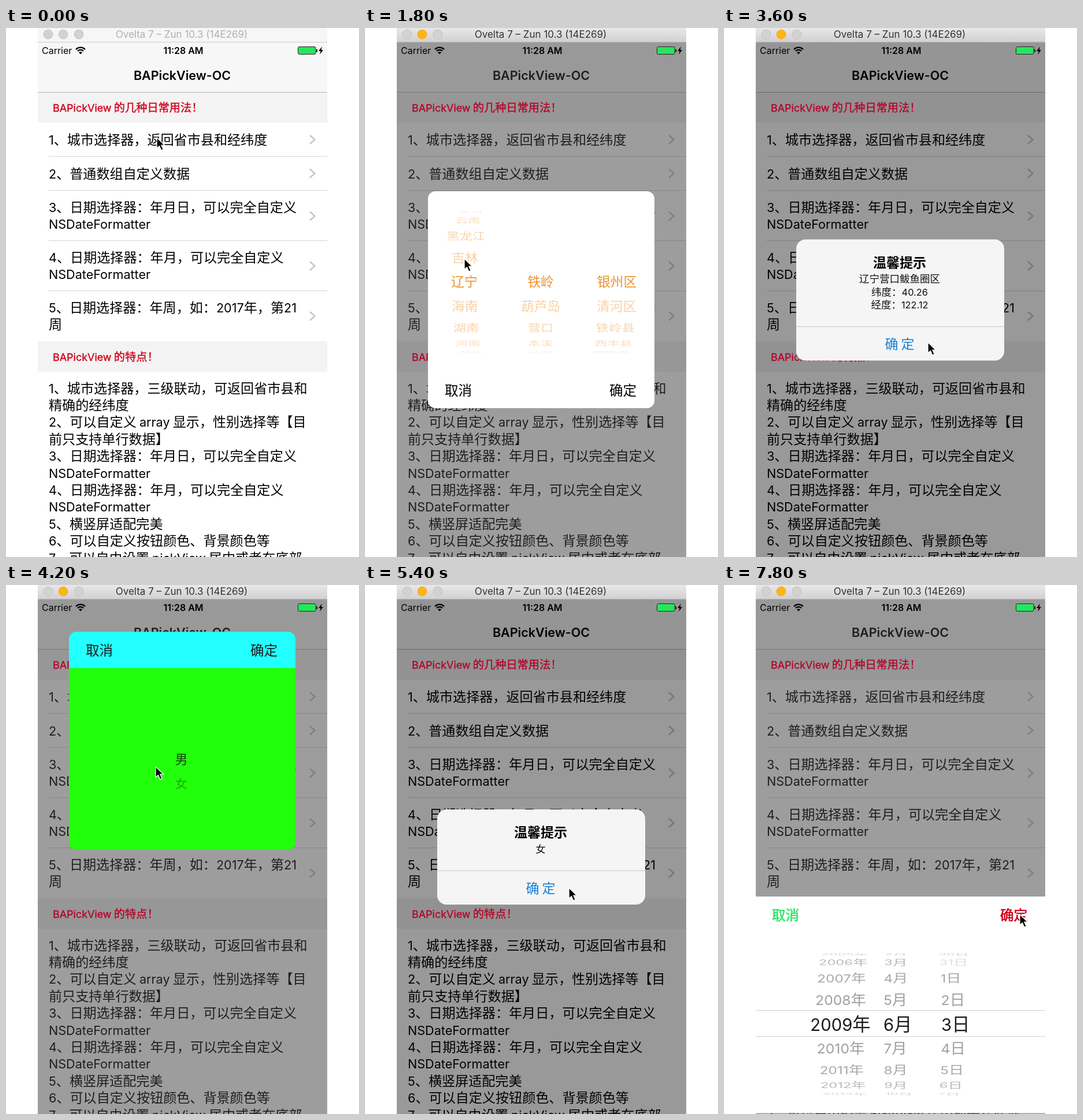
Write an HTML page that moves like this. It is 611 by 917 pixels and loops after 8 s.

```html
<!DOCTYPE html>
<html lang="zh-CN">
<head>
<meta charset="utf-8">
<title>BAPickView-OC</title>
<style>
  html, body { margin: 0; width: 100%; height: 100%; overflow: hidden; background: #fff; }
  #stage { display: block; width: 611px; height: 917px; font-family: "Noto Sans CJK SC", "Noto Sans CJK", sans-serif; }
  tspan { font-family: Inter, sans-serif; font-size: .935em; }
</style>
</head>
<body>
<svg id="stage" viewBox="0 0 611 917"></svg>
<script>
const LOOP = 8000, STEP = 600;
const stage = document.getElementById('stage');

const PROVINCES = '北京 上海 天津 重庆 四川 贵州 云南 黑龙江 吉林 辽宁 海南 湖南 河南 湖北'.split(' ');
const BEIJING = '通州 房山 昌平 顺义 怀柔'.split(' ');
const LIAONING = '铁岭 葫芦岛 营口 本溪 辽阳 盘锦 丹东'.split(' ');
const TIELING = '银州区 清河区 铁岭县 西丰县 昌图县'.split(' ');
const YINGKOU = '鲅鱼圈区 老边区 站前区 西市区 盖州市'.split(' ');

const rect = (x, y, w, h, fill, extra = '') =>
  `<rect x="${x}" y="${y}" width="${w}" height="${h}" fill="${fill}" ${extra}/>`;
const line = (x, y, w, color) => rect(x, y, w, 1.2, color);
const path = (d, extra) => `<path d="${d}" ${extra}/>`;

// Latin runs get their own font through tspan
const text = (x, y, size, str, fill = '#000', extra = '') =>
  `<text x="${x}" y="${y}" font-size="${size}" fill="${fill}" ${extra}>` +
  str.replace(/[!-~–]+( [!-~–]+)*/g, '<tspan>$&</tspan>') + '</text>';
const MID = 'text-anchor="middle"', BOLD = 'font-weight="600"';
const medium = (color, width) => `stroke="${color}" stroke-width="${width}"`;

function titleBar(active) {
  const dot = (x, fill, rim) => `<circle cx="${x}" cy="11" r="8" fill="${fill}" stroke="${rim}" stroke-width=".8"/>`;
  return rect(55, 0, 501, 25, active ? 'url(#chrome)' : '#f6f6f6') +
    line(55, 24, 501, active ? '#b4b1b4' : '#d2d2d2') +
    dot(73, '#d2d2d2', '#bdbdbd') +
    (active ? dot(99, '#fdb414', '#f3ab18') : dot(99, '#d2d2d2', '#c6c6c6')) +
    dot(126, '#d2d2d2', '#bdbdbd') +
    text(304, 16.5, 18.2, 'Ovelta 7 – Zun 10.3 (14E269)', active ? '#333' : '#b0b0b0', MID);
}

function statusBar() {
  const arc = r => path(`M${129 - r * .72} ${45 - r * .72}A${r} ${r} 0 0 1 ${129 + r * .72} ${45 - r * .72}`,
    'fill="none" stroke="#000" stroke-width="2.3"');
  return text(62, 45, 17.1, 'Carrier') + arc(11) + arc(7) +
    path('M129 45.5l-3-3a4.2 4.2 0 0 1 6 0z', '') +
    text(307, 45, 17.1, '11:28 AM', '#000', MID + BOLD) +
    rect(505.5, 32.5, 30.5, 13, '#26e55c', 'rx="2" stroke="#222"') +
    rect(537, 37, 2, 5, '#222') +
    path('M547 32l-6 8h3.5l-1.5 6 6-8h-3.5z', '');
}

function page() {
  const row = (y, str) => text(74, y, 23.1, str);
  const chevron = y => path(`M526 ${y - 7.5}l8.5 7.5-8.5 7.5`, 'fill="none" stroke="#c4c4c9" stroke-width="2.4"');
  const features = [
    '1、城市选择器，三级联动，可返回省市县和', '精确的经纬度',
    '2、可以自定义 array 显示，性别选择等【目', '前只支持单行数据】',
    '3、日期选择器：年月日，可以完全自定义', 'NSDateFormatter',
    '4、日期选择器：年月，可以完全自定义', 'NSDateFormatter',
    '5、横竖屏适配完美', '6、可以自定义按钮颜色、背景颜色等',
    '7、可以自由设置 pickView 居中或者在底部'];
  return rect(55, 25, 501, 87, '#f7f7f7') + line(55, 111, 501, '#b4b4b4') +
    text(305, 90, 23, 'BAPickView-OC', '#000', MID + BOLD) +
    rect(55, 112, 501, 52, '#f3f3f3') + rect(55, 543, 501, 53, '#f3f3f3') +
    [222, 281, 368, 455].map(y => line(74, y, 482, '#d9d9dc')).join('') +
    [193.5, 252, 326, 412.5, 499.5].map(chevron).join('') +
    row(201.5, '1、城市选择器，返回省市县和经纬度') +
    row(260.5, '2、普通数组自定义数据') +
    row(319, '3、日期选择器：年月日，可以完全自定义') + row(348, 'NSDateFormatter') +
    row(405.5, '4、日期选择器：年月，可以完全自定义') + row(435, 'NSDateFormatter') +
    row(492.5, '5、日期选择器：年周，如：2017年，第21') + row(522, '周') +
    features.map((str, i) => row(632.5 + 29.4 * i, str)).join('');
}

const sectionTitles = color =>
  text(81, 145, 19.2, 'BAPickView 的几种日常用法！', color, medium(color, .35)) +
  text(81, 576.5, 19.2, 'BAPickView 的特点！', color, medium(color, .35));

const veil = fill => rect(55, 25, 501, 892, fill);

// Rows sit on a cylinder: 20 degrees apart, radius 123
function wheel({ x, cy, pos, label, fill, size = 22.8, zoom = 1, anchor = 'middle', axis = 305 }) {
  let rows = '';
  for (let i = Math.ceil(pos - 4.3); i <= pos + 4.3; i++) {
    const str = label(i);
    if (!str) continue;
    const angle = (i - pos) * Math.PI / 9, squash = Math.cos(angle);
    const scale = 1 - .09 * (1 - squash);
    const selected = Math.abs(i - pos) < .5;
    const em = selected ? size * zoom : size;
    const opacity = selected ? 1 : (str === '31日' ? .2 : .43) * Math.sqrt(squash);
    rows += `<g transform="translate(${axis + (x - axis) * scale} ${125 + 123 * Math.sin(angle)}) scale(${scale} ${squash})" opacity="${opacity}">` +
      text(0, em * .37, em, str, fill, `text-anchor="${anchor}"`) + '</g>';
  }
  return `<svg y="${cy - 125}" width="611" height="250">${rows}</svg>`;
}

const buttons = (left, right, y, cancel, confirm, weight = 0) =>
  text(left, y, 23.6, '取消', cancel, medium(cancel, weight)) +
  text(right, y, 23.6, '确定', confirm, medium(confirm, weight));

function cityPicker(province, cities, city, districts) {
  const column = (x, list, pos) => wheel({ x, cy: 440, pos, label: i => list[i], fill: '#ee922a' });
  return rect(109, 283, 392, 376, '#fff', 'rx="13"') +
    column(172, PROVINCES, province) + column(304, cities, city) + column(436, districts, 0) +
    buttons(138, 423, 636.5, '#000', '#000');
}

function genderPicker(pos) {
  return rect(109, 81, 392, 378, '#22ff0a', 'rx="13"') +
    path('M109 144V94a13 13 0 0 1 13-13H488a13 13 0 0 1 13 13V144z', 'fill="#22ffff"') +
    wheel({ x: 303.5, cy: 302, pos, label: i => '男女'[i], fill: '#123c0c', size: 21.5 }) +
    buttons(138, 423, 122, '#1c1c1c', '#1c1c1c');
}

function datePicker(year) {
  const cycle = (i, n) => ((i - 1) % n + n) % n + 1;
  const column = (x, pos, label, anchor) =>
    wheel({ x, cy: 761, pos, label, anchor, fill: '#1c1c1c', size: 26.6, zoom: 1.18 });
  return rect(55, 540, 501, 375.5, '#fff') +
    line(55, 737, 501, '#d4d4d4') + line(55, 782, 501, '#d4d4d4') +
    column(201.5, year, i => i + '年') +
    column(276, 6, i => cycle(i, 12) + '月', 'start') +
    column(376, 3, i => cycle(i, 31) + '日', 'start') +
    buttons(83, 478, 580.5, '#2fe866', '#d0021b', .7);
}

function alertBox(...lines) {
  const h = 165 + 22.5 * (lines.length - 1), top = 471.5 - h / 2, bottom = top + h;
  return rect(125, top, 360, h, '#f5f5f5', 'rx="16"') +
    text(304, top + 48, 23, '温馨提示', '#000', MID + BOLD) +
    lines.map((str, i) => text(304, top + 74.5 + 22.5 * i, 17.5, str, '#111', MID)).join('') +
    line(125, bottom - 59.5, 360, '#cfcfd2') +
    text(304, bottom - 20.5, 23, '确 定', '#1580d8', MID);
}

const pointer = ([x, y, pressed]) =>
  (pressed ? `<circle cx="${x + 1}" cy="${y + 2}" r="27" fill="none" stroke="#000" stroke-width="4"/>` : '') +
  path(`M${x} ${y}v18.5l4.4-4 3.3 7.6 3.5-1.5-3.3-7.4h5.8z`, 'stroke="#fff" stroke-width="1.3"');

const PICK = 'rgba(60,60,60,.5)', ALERT = 'rgba(0,0,0,.4)';
const scenes = [
  [[261, 190], null, ''],
  [[260, 239], PICK, cityPicker(0, BEIJING, 0, [])],
  [[172, 430, true], PICK, cityPicker(4.4, BEIJING, 0, [])],
  [[172, 400], PICK, cityPicker(9, LIAONING, 0, TIELING)],
  [[302, 400], PICK, cityPicker(9, LIAONING, 2, YINGKOU)],
  [[445, 634], PICK, cityPicker(9, LIAONING, 2, YINGKOU)],
  [[353, 545], ALERT, alertBox('辽宁营口鲅鱼圈区', '纬度：40.26', '经度：122.12')],
  [[259, 315], PICK, genderPicker(0)],
  [[445, 118], PICK, genderPicker(1)],
  [[353, 525], ALERT, alertBox('女')],
  [[260, 318], null, ''],
  [[223, 686, true], PICK, datePicker(2018.93)],
  [[223, 790, true], PICK, datePicker(2011.6)],
  [[512, 571], PICK, datePicker(2009)]
];

const defs = `<defs><linearGradient id="chrome" x2="0" y2="1">
  <stop stop-color="#eae7ea"/><stop offset="1" stop-color="#d2cfd2"/></linearGradient></defs>`;
const base = page(), status = statusBar();

function draw(index) {
  const [cursor, shade, popup] = scenes[index];
  stage.innerHTML = defs + base + (shade ? veil(shade) : '') +
    sectionTitles(shade ? '#b4062a' : '#d0021b') +
    status + titleBar(index > 0) + popup + pointer(cursor);
}

let shown = -1;
function tick(now) {
  const index = Math.floor(now % LOOP / STEP);
  if (index !== shown) draw(shown = index);
  requestAnimationFrame(tick);
}
tick(performance.now());
</script>
</body>
</html>
```
